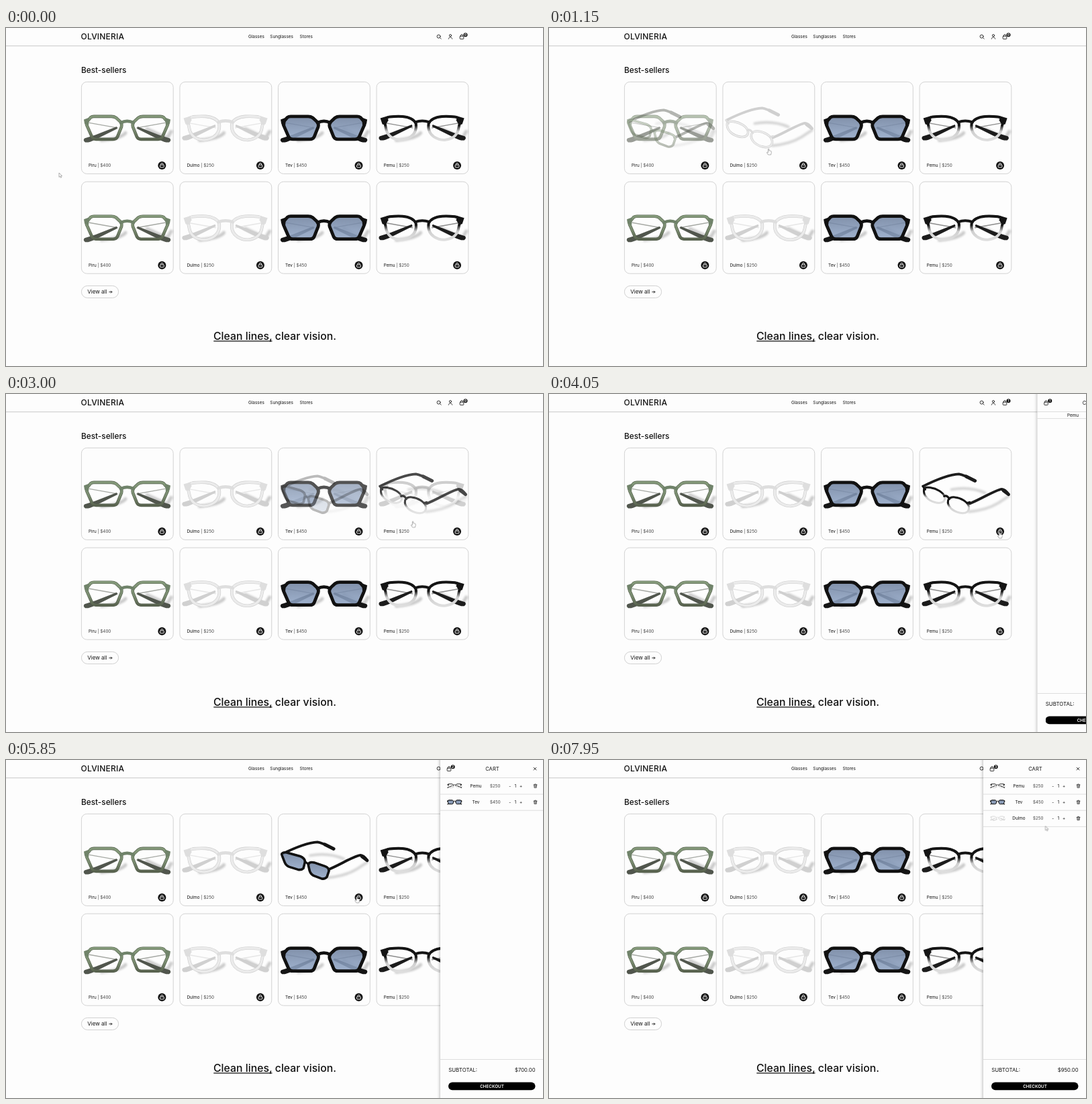
Write an HTML page that moves like this. It is 800 px wide and 504 px high and loops after 8000 ms.

```html
<!DOCTYPE html>
<html lang="en">
<head>
<meta charset="utf-8">
<title>Eyewear shop</title>
<style>
  @property --a { syntax: "<number>"; inherits: true; initial-value: 0; }
  @property --p { syntax: "<number>"; inherits: true; initial-value: 0; }
  html, body { margin: 0; width: 100%; height: 100%; overflow: hidden; background: #fdfdfd; }
  svg { display: block; width: 800px; height: 504px; font: 6.4px Inter, sans-serif; fill: #111; }
  .thin { fill: none; stroke: #222; stroke-width: .9; stroke-linecap: round; stroke-linejoin: round; }
  .rule { stroke: #d6d6d6; stroke-width: .8; }
  .mid { text-anchor: middle; }
  .end { text-anchor: end; }
  .title { font-weight: 500; }
  .price { fill: #444; }

  /* Product crossfades: --a is the share of the angled view */
  .hover { animation: 8s linear infinite; }
  .front { opacity: calc(1 - var(--a)); }
  .alt { opacity: var(--a); }
  .hover0 { animation-name: hover0; }
  .hover1 { animation-name: hover1; }
  .hover2 { animation-name: hover2; }
  .hover3 { animation-name: hover3; }
  @keyframes hover0 {
    0%, 5% { --a: 0; } 8.125%, 11.875% { --a: 1; } 16.25%, 100% { --a: 0; }
  }
  @keyframes hover1 {
    0%, 11.875% { --a: 0; } 14.125%, 25.625% { --a: 1; } 29.375%, 75.625% { --a: 0; }
    78.125%, 94.375% { --a: 1; } 98.75%, 100% { --a: 0; }
  }
  @keyframes hover2 {
    0%, 26% { --a: 0; } 29.125%, 34.375% { --a: 1; } 38.75%, 61.875% { --a: 0; }
    65%, 74.375% { --a: 1; } 78.75%, 100% { --a: 0; }
  }
  @keyframes hover3 {
    0%, 35% { --a: 0; } 38.125%, 56.875% { --a: 1; } 61.875%, 100% { --a: 0; }
  }

  /* Cart drawer and its rows */
  #cart { animation: slide 8s linear infinite; }
  @keyframes slide {
    0%, 50% { transform: translateX(165px); }
    50.625% { transform: translateX(81px); animation-timing-function: ease-out; }
    54.375%, 100% { transform: none; }
  }
  .row { opacity: calc(var(--p) * 4); animation: 8s linear infinite; }
  .row .cells { transform: translateY(calc((var(--p) - 1) * 12.2px)); }
  .row .rule { transform: translateY(calc((var(--p) - 1) * 24.2px)); }
  .row .thumb { opacity: calc(var(--p) * 2 - 1); }
  .row0 { animation-name: row0; }
  .row1 { animation-name: row1; }
  .row2 { animation-name: row2; }
  @keyframes row0 { 0%, 50% { --p: 0; } 50.625% { --p: .4; } 53%, 100% { --p: 1; } }
  @keyframes row1 { 0%, 68.75% { --p: 0; } 71.25%, 100% { --p: 1; } }
  @keyframes row2 { 0%, 83.75% { --p: 0; } 86.25%, 100% { --p: 1; } }

  /* Values by number of items in the cart */
  .count { opacity: 0; animation: 8s step-end infinite; }
  .n0 { animation-name: n0; }
  .n1 { animation-name: n1; }
  .n2 { animation-name: n2; }
  .n3 { animation-name: n3; }
  @keyframes n0 { 0% { opacity: 1; } 47.5% { opacity: 0; } }
  @keyframes n1 { 0% { opacity: 0; } 47.5% { opacity: 1; } 68.75% { opacity: 0; } }
  @keyframes n2 { 0% { opacity: 0; } 68.75% { opacity: 1; } 83.75% { opacity: 0; } }
  @keyframes n3 { 0% { opacity: 0; } 83.75% { opacity: 1; } }

  /* Pointer */
  #pointer { fill: #fff; stroke: #8c8c8c; stroke-width: .7; stroke-linejoin: round; animation: move 8s linear infinite; }
  @keyframes move {
    0%, .625% { transform: translate(79px, 216px); }
    6.25% { transform: translate(150px, 182px); }
    10.6% { transform: translate(200px, 178px); }
    13.1% { transform: translate(300px, 178px); }
    14.375% { transform: translate(327px, 180px); }
    21.25% { transform: translate(330px, 183px); }
    23.75% { transform: translate(338px, 182px); }
    26.9% { transform: translate(425px, 180px); }
    28.75% { transform: translate(463px, 176px); }
    32.5% { transform: translate(470px, 178px); }
    36.25% { transform: translate(585px, 185px); }
    41.25% { transform: translate(668px, 204px); }
    43.1%, 54.4% { transform: translate(671px, 206px); }
    59.375% { transform: translate(579px, 211px); }
    62.5% { transform: translate(535px, 206px); }
    65.6%, 73.1% { transform: translate(524px, 204px); }
    76.25% { transform: translate(392px, 203px); }
    80%, 93.1% { transform: translate(377px, 204px); }
    99.375%, 100% { transform: translate(739.5px, 98.5px); }
  }
  .arrow { animation: arrow 8s step-end infinite; }
  .hand { animation: hand 8s step-end infinite; }
  @keyframes arrow { 0% { opacity: 1; } 3.7% { opacity: 0; } 96% { opacity: 1; } }
  @keyframes hand { 0% { opacity: 0; } 3.7% { opacity: 1; } 96% { opacity: 0; } }
</style>
</head>
<body>
<svg viewBox="0 0 800 504">
  <defs>
    <linearGradient id="green" x2="0" y2="1">
      <stop stop-color="#84997a"/><stop offset=".6" stop-color="#7a8c70"/><stop offset="1" stop-color="#59634f"/>
    </linearGradient>
    <linearGradient id="fade" x2="0" y2="1">
      <stop offset=".38" stop-color="#141414"/><stop offset=".64" stop-color="#cfcfcf"/><stop offset="1" stop-color="#dedede"/>
    </linearGradient>
    <linearGradient id="blue" x2="0" y2="1">
      <stop stop-color="#70829f"/><stop offset="1" stop-color="#93a8c8"/>
    </linearGradient>
    <filter id="soft" x="-20%" y="-50%" width="140%" height="200%"><feGaussianBlur stdDeviation="1.8"/></filter>
    <filter id="edge" x="-100%" width="300%"><feGaussianBlur stdDeviation="2"/></filter>
    <g id="bag">
      <rect class="thin" x="-2.8" y="-1.1" width="5.6" height="4.3" rx=".7"/>
      <path class="thin" d="M-1.5 -1.1V-2a1.5 1.5 0 0 1 3 0v.9"/>
    </g>
    <g id="add">
      <circle r="6"/>
      <rect x="-2.9" y="-.7" width="5.8" height="3.6" rx=".6" fill="none" stroke="#fff" stroke-width=".9"/>
      <path d="M-1.6 -.9V-1.8a1.6 1.6 0 0 1 3.2 0v.9" fill="none" stroke="#fff" stroke-width=".9"/>
    </g>
    <g id="trash" class="thin" style="stroke-width:.7">
      <path d="M-2.5 -1.7H2.5M-1 -1.9V-2.7H1V-1.9M-1.9 -1.6L-1.6 2.6H1.6L1.9 -1.6M-.6 -.4V1.5M.6 -.4V1.5"/>
    </g>
    <g id="models"></g>
  </defs>

  <rect width="800" height="504" fill="#fdfdfd"/>
  <path d="M0 27.4H800" stroke="#f0f0f0"/>
  <path d="M0 26.5H800" stroke="#cfcfcf" stroke-width=".9"/>
  <text class="title" x="111.6" y="17.3" font-size="12" letter-spacing=".2">OLVINERIA</text>
  <text x="361" y="15.3">Glasses</text>
  <text x="393.3" y="15.3">Sunglasses</text>
  <text x="437.6" y="15.3">Stores</text>
  <g class="thin">
    <circle cx="644.6" cy="12.6" r="2.5"/><path d="M646.5 14.5L648.2 16.2"/>
    <circle cx="662" cy="11.2" r="1.6"/><path d="M659.3 16.2C659.5 12.8 664.5 12.8 664.7 16.2"/>
  </g>
  <use href="#bag" x="679" y="13.2"/>
  <g id="badge" transform="translate(684.5 10.3)"></g>

  <text class="title" x="112" y="66.8" font-size="11.8">Best-sellers</text>
  <g id="cards"></g>

  <rect x="112.4" y="384.4" width="55.2" height="18" rx="9" fill="none" stroke="#c6c6c6" stroke-width=".8"/>
  <text x="121.2" y="396.2" font-size="8">View all</text>
  <path class="thin" d="M153.8 393.6H157.8M156.3 392L157.9 393.6L156.3 395.2"/>

  <text class="title" x="309" y="464.8" font-size="15.8">Clean lines, clear vision.</text>
  <path d="M309.3 466.9H396.5" stroke="#111" stroke-width="1.1"/>

  <g id="cart">
    <rect x="646" y="-5" width="8" height="514" fill="#000" opacity=".25" filter="url(#edge)"/>
    <rect x="647" width="160" height="504" fill="#fdfdfd"/>
    <path class="rule" d="M647 26.5H800M647 446.5H800"/>
    <use href="#bag" x="660" y="13.2"/>
    <g id="cartBadge" transform="translate(665.7 10.2)"></g>
    <text class="mid" x="724.5" y="15.8" font-size="7.7">CART</text>
    <path class="thin" d="M786.2 11.2L790 15M790 11.2L786.2 15"/>
    <g id="rows"></g>
    <text x="659.2" y="465.2" font-size="7.9">SUBTOTAL:</text>
    <g id="totals" class="end" font-size="7.7"></g>
    <rect x="659" y="480.4" width="129.5" height="11.8" rx="5.9" fill="#000"/>
    <text class="mid" x="724" y="488.6" font-size="6.3" font-weight="600" fill="#fff">CHECKOUT</text>
  </g>

  <g id="pointer">
    <path class="arrow" d="M0 0V6.4L1.5 5.1L2.6 7.3L3.6 6.8L2.6 4.7L4.6 4.6Z"/>
    <path class="hand" d="M-.6 .5Q.1 -.5 .8 .5V3Q2 2.5 2.5 3.2Q3.6 2.9 4.2 4V6.4L3.4 9H-.4L-2.6 5.7Q-2.4 4.4 -.6 5.6Z"/>
  </g>
</svg>

<script>
  const hex = {
    lens: "M8 60L14 53Q16 51.5 19 51.5H45Q49 51.5 52 53.5L59 60Q61 63 60 67L54 82Q52 85.5 48 85.5H22Q18 85.5 16 82L9 66Q7 62 8 60Z",
    bridge: "M59 61Q68.5 56 78 61",
    hinge: "M4 56L12 53L11 65L5 62Z",
    lift: 0,
    altLens: ["M6 59Q8 57 13 57.5L33 63Q40 66 40.5 71L38 81Q35 84 30 83L17 79Q12 77 10 72L6.5 63Q5 61 6 59Z",
              "M45 75Q47 71 54 72.5L70 78Q76 80 76 85L73 94Q70 97.5 65 96.5L53 92Q48 89 47 84Z"],
    altBridge: "M40 71L46 75"
  };
  const round = {
    lens: "M11 58Q14 53 20 52Q30 51 39 51.5Q55 53 59 62Q61 75 51 82Q43 87 35 86.5Q19 85 15 72Q14 64 11 58Z",
    bridge: "M58 60Q68.5 56 79 60",
    hinge: "M6 54L16 51L18 57L14 64L9 63Z",
    lift: -3,
    altLens: ["M7 61C9 57 22 59 30 64C38 69 40 76 36 80C30 85 16 80 11 74C8 71 6 67 7 61Z",
              "M43 78C46 71 58 73 66 78C74 83 76 90 72 95C66 100 53 96 47 90C43 86 42 82 43 78Z"],
    altBridge: "M37 72Q41 70 45 76M5 57L9 62M71 82L75 81"
  };
  const products = [
    { name: "Piru", price: 400, shape: hex, rim: "url(#green)", edge: "#55604e", solid: "#70836a", arm: "#51564d", lens: "none", width: 4.6 },
    { name: "Dulmo", price: 250, shape: round, rim: "#ebebeb", edge: "#cdcdcd", solid: "#dedede", arm: "#d0d0d0", lens: "none", width: 4.6 },
    { name: "Tev", price: 450, shape: hex, rim: "#111", edge: "#111", solid: "#111", arm: "#151515", lens: "url(#blue)", width: 4.8 },
    { name: "Pemu", price: 250, shape: round, rim: "url(#fade)", edge: "url(#fade)", solid: "#141414", arm: "#1c1c1c", lens: "none", width: 4 }
  ];

  const each = (list, make) => list.map(make).join("");
  const fill = (id, html) => { document.getElementById(id).innerHTML = html; };
  const line = (d, color, width, more = "") =>
    `<path d="${d}" fill="none" stroke="${color}" stroke-width="${width}" stroke-linejoin="round" stroke-linecap="round" ${more}/>`;
  const shade = (d, width, opacity) => line(d, "#000", width, `opacity="${opacity}" filter="url(#soft)"`);

  const rim = (d, p, width) =>
    `<path d="${d}" fill="${p.lens}" opacity=".88"/>` + line(d, p.edge, width) + line(d, p.rim, width - 1.2);

  function frontView(p) {
    const s = p.shape;
    const arm = `<path transform="translate(0 ${s.lift})" fill="${p.arm}"
      d="M53 66.5L54 69.5L21 86Q11 91 6 90Q2 87 5 84L21 79Z"/>`;
    const half = arm + line("M12 61L54 68.5", p.arm, 1.4, 'opacity=".5"') + rim(s.lens, p, p.width) +
      `<path d="${s.hinge}" fill="${p.solid}"/>`;
    return shade("M98 70L128 84L134 74M30 87Q60 84 66 76", 5, .2) + half +
      `<g transform="matrix(-1 0 0 1 137 0)">${half}</g>` + line(s.bridge, p.solid, p.width);
  }

  function altView(p) {
    const s = p.shape;
    return shade("M74 95Q100 93 118 82L133 72M48 62Q75 57 98 67", 4, .16) +
      `<g transform="translate(0 ${s.lift})">` +
      line("M6 60C22 52 42 43 59 42Q66 43 83 52", p.arm, 3.6) + line("M70 45.5L83 52", p.arm, 5) + "</g>" +
      line("M75 83C93 76 112 63 123 61.5Q128 62 133 69", p.arm, 3.8) + line("M125 63.5L133 69.5", p.arm, 4.6) +
      each(s.altLens, d => rim(d, p, p.width * .75)) + line(s.altBridge, p.solid, 3);
  }

  function card(i, row) {
    const p = products[i];
    const hover = row ? "" : `hover hover${i}`;
    return `<g transform="translate(${112 + 146.55 * i} ${80.4 + 148.8 * row})">
      <rect x=".4" width="136.8" height="137" rx="8" fill="none" stroke="#c8c8c8" stroke-width=".8"/>
      <g class="${hover}"><use class="front" href="#front${i}"/><use class="alt" href="#alt${i}"/></g>
      <text x="11" y="126.6" font-size="6.3">${p.name}<tspan class="price"> | $${p.price}</tspan></text>
      <use href="#add" x="120.4" y="124.5"/></g>`;
  }

  function cartRow(i, slot) {
    const p = products[i], y = 38.7 + 24.2 * slot;
    return `<g class="row row${slot}">
      <g class="cells">
        <g class="thumb"><use href="#front${i}" transform="translate(656.6 ${y - 11.8}) scale(.17)"/></g>
        <text class="mid" x="700" y="${y + 2.2}">${p.name}</text>
        <text class="price" x="721" y="${y + 2.2}" font-size="6.2">$${p.price}</text>
        <text class="mid" y="${y + 2.2}"><tspan x="750.7">-</tspan><tspan x="758.7">1</tspan><tspan x="767">+</tspan></text>
        <use href="#trash" x="788.6" y="${y}"/>
      </g>
      <path class="rule" d="M647 ${y + 12.3}H800"/></g>`;
  }

  const digits = list => '<circle r="3"/>' +
    each(list, n => `<text class="count n${n} mid" y="1.6" font-size="4.5" font-weight="700" fill="#fff">${n}</text>`);

  const views = products.map((p, i) => `<g id="front${i}">${frontView(p)}</g><g id="alt${i}">${altView(p)}</g>`);
  fill("models", views.join(""));
  fill("cards", each([0, 1], row => each([0, 1, 2, 3], i => card(i, row))));
  fill("rows", each([3, 2, 1], cartRow));
  fill("badge", digits([0, 1, 2, 3]));
  fill("cartBadge", digits([1, 2, 3]));
  fill("totals", each([250, 700, 950], (sum, i) =>
    `<text class="count n${i + 1}" x="788.5" y="465.2">$${sum}.00</text>`));
</script>
</body>
</html>
```
